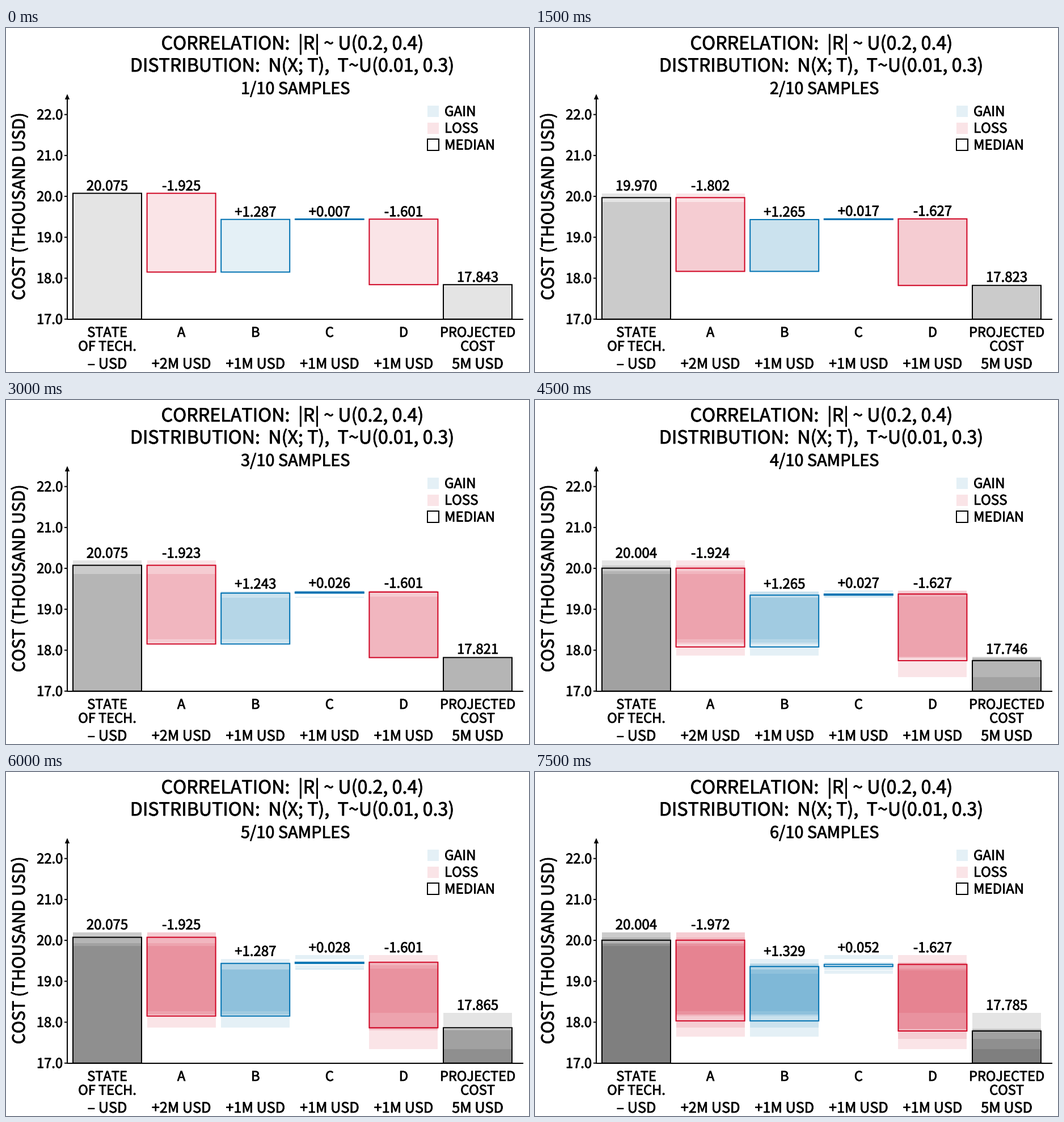
A matplotlib script that plays this animation: 922 px wide and 607 px high, repeating every 8 s.

```python
import matplotlib.pyplot as plt
import numpy as np
from matplotlib.animation import FuncAnimation
from matplotlib.patches import Polygon, Rectangle
from matplotlib.patheffects import withStroke

plt.rcParams["font.family"] = "Noto Sans CJK JP"

W, H, DPI = 922, 607, 100
PT = 72 / DPI
STEP, HOLD, LOOP = 500, 1500, 8000
AXIS_Y, BASE_Y, UNIT, BASE_COST = 514, 513.7, 72.2, 17.0
BAR_X, BAR_STEP, BAR_W = 118, 130.6, 121
ALPHA = 0.107
BLACK, BLUE, RED = "#000000", "#0072b2", "#d00524"
COLORS = [BLACK, RED, BLUE, BLUE, RED, BLACK]
MEDIUM = [withStroke(linewidth=0.8 * PT, foreground=BLACK)]

# One row per sample: starting cost, then the changes A, B, C and D
SAMPLES = np.array([
    [20.0754, -1.9251, 1.2868, 0.0066, -1.6006],
    [19.8638, -1.6787, 1.2434, 0.0283, -1.6530],
    [20.1900, -1.9231, 1.0180, 0.0256, -1.4900],
    [19.9334, -2.0630, 1.4300, 0.0900, -2.0500],
    [20.2000, -2.0197, 1.3704, 0.0900, -1.4080],
    [19.9150, -2.2650, 1.5400, 0.0749, -1.6750],
])

fig = plt.figure(figsize=(W / DPI, H / DPI), dpi=DPI, facecolor="white")
ax = fig.add_axes([0, 0, 1, 1])
ax.set_xlim(0, W)
ax.set_ylim(H, 0)
ax.axis("off")


def to_y(cost):
    return BASE_Y - (cost - BASE_COST) * UNIT


def write(x, y, text, size, ha="center", **kw):
    return ax.text(x, y, text, fontsize=size * PT, ha=ha, va="baseline",
                   path_effects=MEDIUM, **kw)


def box(x, y, w, h, **kw):
    return ax.add_patch(Rectangle((x, y), w, h, **kw))


def outline(x, y, w, h, color):
    return box(x, y, w, h, fc="none", ec=color, lw=2 * PT, snap=False, zorder=3)


def line(xs, ys):
    ax.plot(xs, ys, color=BLACK, lw=2 * PT, solid_capstyle="butt",
            snap=False, zorder=4)


def spans(row):
    """Low and high cost of each of the six waterfall bars."""
    ends = np.cumsum(row)
    pairs = [(BASE_COST, ends[0])]
    pairs += [tuple(sorted(p)) for p in zip(ends, ends[1:])]
    return pairs + [(BASE_COST, ends[-1])]


def place(rect, low, high):
    rect.set_y(to_y(high))
    rect.set_height(to_y(low) - to_y(high))


# Titles
write(505, 38, "CORRELATION:  |R| ~ U(0.2, 0.4)", 32.3)
write(505, 77, "DISTRIBUTION:  N(X; T),  T~U(0.01, 0.3)", 32.2)
counter = write(510, 116.5, "", 28.9)

# Axes
line([108, 108], [AXIS_Y + 1, 122])
line([107, 912], [AXIS_Y, AXIS_Y])
ax.add_patch(Polygon([(108, 116.5), (103.8, 126), (112.2, 126)], fc=BLACK, lw=0))
for cost in range(17, 23):
    line([103, 108], [to_y(cost)] * 2)
    write(100, to_y(cost) + 8.5, f"{cost:.1f}", 23.7, "right")
write(33, 315, "COST (THOUSAND USD)", 29.8, rotation=90, rotation_mode="anchor")

# Legend
for y, name, color in [(137, "GAIN", BLUE), (166.5, "LOSS", RED)]:
    box(743, y, 20, 20, fc=color, alpha=ALPHA, lw=0)
    write(773, y + 18.3, name, 24, "left")
outline(743, 196, 20, 20, BLACK)
write(773, 214.5, "MEDIAN", 24, "left")

# Bars
lefts = BAR_X + BAR_STEP * np.arange(6)
centers = lefts + BAR_W / 2
names = ["STATE\nOF TECH.", "A", "B", "C", "D", "PROJECTED\nCOST"]
budgets = ["– USD", "+2M USD", "+1M USD", "+1M USD", "+1M USD", "5M USD"]
for x, name, budget in zip(centers, names, budgets):
    for k, part in enumerate(name.split("\n")):
        write(x, 545 + 24.5 * k, part, 23.6)
    write(x, 601, budget, 25.2)

layers = []
for row in SAMPLES:
    layer = []
    for x, color, (low, high) in zip(lefts, COLORS, spans(row)):
        rect = box(x, 0, BAR_W, 0, fc=color, alpha=ALPHA, lw=0)
        place(rect, low, high)
        layer.append(rect)
    layers.append(layer)
frames = [outline(x, 0, BAR_W, 0, c) for x, c in zip(lefts, COLORS)]
labels = [write(x, 0, "", 24) for x in centers]


def draw(i):
    count = i * STEP // HOLD + 1
    counter.set_text(f"{count}/10 SAMPLES")
    for k, layer in enumerate(layers):
        for rect in layer:
            rect.set_visible(k < count)

    median = np.median(SAMPLES[:count], axis=0)
    tops = np.array([[high for _, high in spans(row)]
                     for row in [*SAMPLES[:count], median]]).max(axis=0)
    texts = [f"{median[0]:.3f}", *(f"{v:+.3f}" for v in median[1:]),
             f"{median.sum():.3f}"]
    for rect, (low, high) in zip(frames, spans(median)):
        place(rect, low, high)
    for label, text, top in zip(labels, texts, tops):
        label.set_text(text)
        label.set_y(to_y(top) - 5)
    return [counter, *frames, *labels]


anim = FuncAnimation(fig, draw, frames=LOOP // STEP, interval=STEP,
                     repeat=True, repeat_delay=0, blit=False)
plt.show()
```
